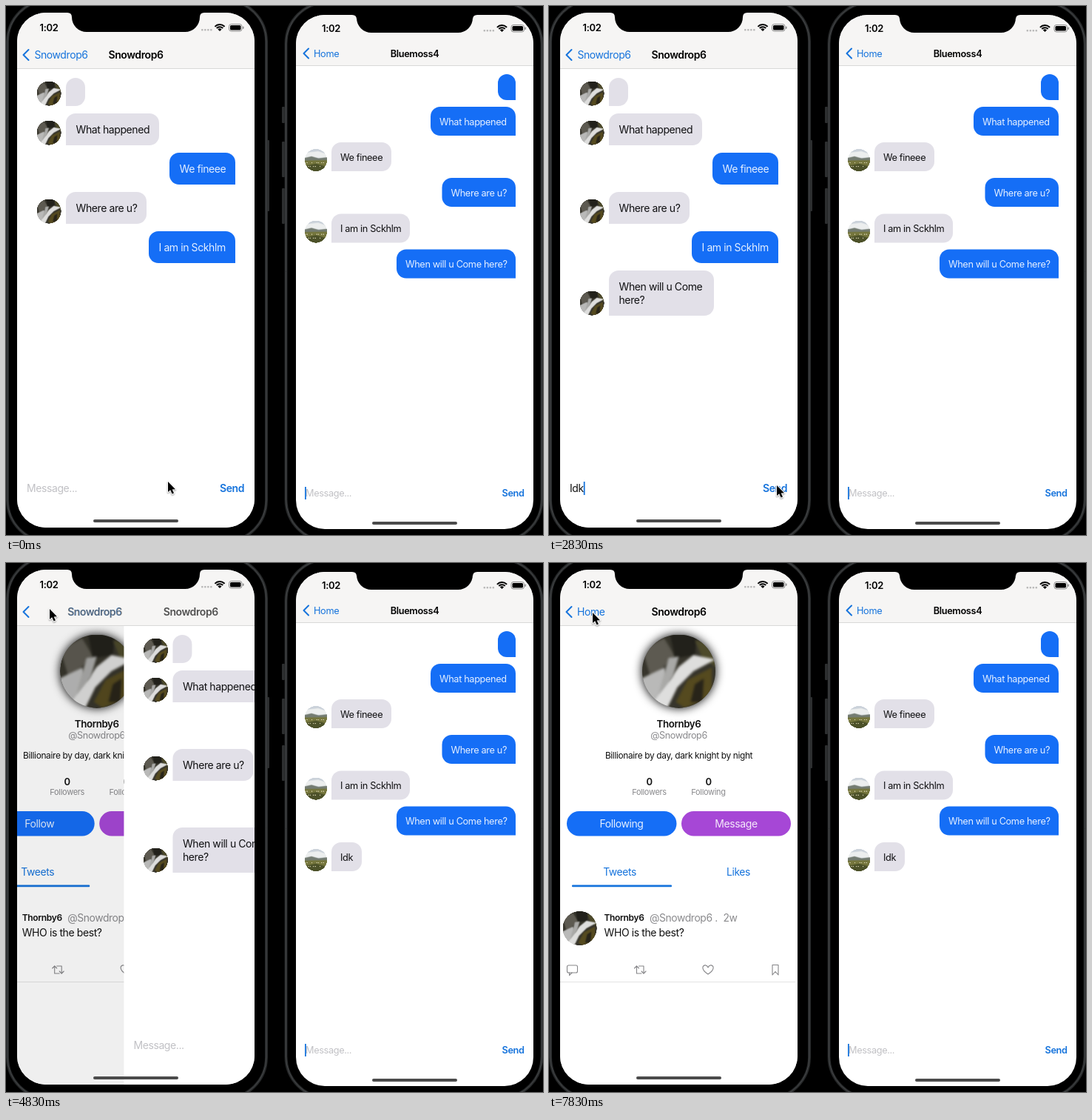
An HTML page with a canvas for the animation above (8 s loop, 726 px wide and 714 px high).

```html
<!DOCTYPE html>
<html lang="en">
<head>
<meta charset="utf-8">
<title>Chat on two phones</title>
<style>
html, body { margin: 0; width: 100%; height: 100%; overflow: hidden; background: #000; }
canvas { display: block; width: 726px; height: 714px; }
</style>
</head>
<body>
<canvas id="stage" width="726" height="714"></canvas>
<script>
const ctx = document.getElementById('stage').getContext('2d');
const LOOP = 8000, FPS = 6;
const BLUE = '#156ef6', LINK = '#1573dc', GREY = '#e2e0e8', HINT = '#c1c1c5', MUTED = '#8a8a8d';
const LEFT_USER = 'Snowdrop6', RIGHT_USER = 'Bluemoss4', FULL_NAME = 'Thornby6';

// Event times in ms
const POP = 4666.7, POP_LENGTH = 356;
const ARRIVE = 500, FOCUS = 1000, SENT = 3000, RECEIVED = 3330;
const PRESS = 6600, FOLLOWED = 6990;

const clamp = v => Math.max(0, Math.min(1, v));
const ease = v => (1 - Math.cos(Math.PI * clamp(v))) / 2;

function text(str, x, y, size, color, weight = 400, align = 'left') {
  ctx.font = `${weight} ${size}px Inter, Roboto, sans-serif`;
  ctx.letterSpacing = `${-0.029 * size}px`;
  ctx.textAlign = align;
  ctx.fillStyle = color;
  ctx.fillText(str, x, y + size * 0.364);
}

function box(x, y, w, h, r, color) {
  ctx.fillStyle = color;
  ctx.beginPath();
  ctx.roundRect(x, y, w, h, r);
  ctx.fill();
}

function line(points, color, width) {
  ctx.strokeStyle = color;
  ctx.lineWidth = width;
  ctx.lineCap = ctx.lineJoin = 'round';
  ctx.beginPath();
  points.forEach(([x, y], i) => i ? ctx.lineTo(x, y) : ctx.moveTo(x, y));
  ctx.stroke();
}

function withAlpha(alpha, draw) {
  ctx.save();
  ctx.globalAlpha *= clamp(alpha);
  draw();
  ctx.restore();
}

// Round pictures, painted once on a 100-unit square
function picture(paint) {
  const c = document.createElement('canvas');
  c.width = c.height = 200;
  const g = c.getContext('2d');
  g.scale(2, 2);
  g.beginPath();
  g.arc(50, 50, 50, 0, 7);
  g.clip();
  g.filter = 'blur(3px)';
  paint((color, ...p) => {
    g.fillStyle = color;
    g.beginPath();
    for (let i = 0; i < p.length; i += 2) g.lineTo(p[i], p[i + 1]);
    g.fill();
  }, g);
  return c;
}

const waterfall = picture(shape => {
  shape('#37352c', -9, -9, 109, -9, 109, 109, -9, 109);
  shape('#5d5a51', 0, 20, 30, 5, 45, 30, 12, 60);
  shape('#22211b', 38, 0, 75, 0, 72, 28, 45, 32);
  shape('#4d4a2b', 72, 8, 109, 15, 109, 50, 82, 32);
  shape('#b9b9b8', -5, 62, 30, 45, 40, 70, 20, 109, -5, 109);
  shape('#dededd', 70, 28, 100, 34, 70, 50, 48, 72, 30, 109, 10, 100, 34, 66, 50, 44);
  shape('#a9a9a7', 36, 32, 50, 30, 42, 58, 22, 82);
  shape('#554a1f', 62, 62, 95, 45, 95, 85, 58, 100, 46, 92);
  shape('#282419', 72, 68, 84, 60, 82, 92, 66, 92);
});

const meadow = picture((shape, g) => {
  shape('#cbd2da', -9, -9, 109, -9, 109, 109, -9, 109);
  shape('#eceeee', -9, 18, 60, 10, 109, 26, 109, 40, -9, 40);
  shape('#747c72', -9, 42, 30, 33, 62, 42, 109, 36, 109, 60, -9, 60);
  shape('#75763d', -9, 52, 109, 50, 109, 109, -9, 109);
  shape('#4c5129', -9, 78, 50, 66, 109, 82, 109, 109, -9, 109);
  g.filter = 'blur(1px)';
  g.fillStyle = '#ddd7b6';
  for (let i = 0; i < 14; i++) g.fillRect((i * 37) % 96, 60 + (i * 17) % 34, 4, 4);
});

const avatar = (img, x, y, r) => ctx.drawImage(img, x - r, y - r, 2 * r, 2 * r);

// A message bubble: theirs hangs from its left edge, mine from its right edge
function bubble(mine, edge, y, w, h, lines, size, pad) {
  const x = mine ? edge - w : edge;
  const r = Math.min(13, w / 2);
  box(x, y, w, h, mine ? [r, r, 0, r] : [r, r, r, 0], mine ? BLUE : GREY);
  const step = size * 1.29, top = y + h / 2 + 0.5 - (lines.length - 1) * step / 2;
  lines.forEach((s, i) => text(s, x + pad, top + i * step, size, mine ? '#e4efff' : '#101012'));
}

function chevron(x, y, h) {
  line([[x + h / 2, y - h / 2], [x, y], [x + h / 2, y + h / 2]], LINK, 2);
}

function statusBar(x, y) {
  text('1:02', x + 43, y + 20.5, 13, '#000', 600, 'center');
  for (let i = 0; i < 4; i++) box(x + 249 + i * 4, y + 22, 2.6, 2.6, 1, '#b9b9b9');
  const cx = x + 274, cy = y + 25;
  ctx.strokeStyle = '#000';
  ctx.lineCap = 'butt';
  ctx.lineWidth = 2;
  for (const r of [9, 5.8]) {
    ctx.beginPath();
    ctx.arc(cx, cy, r, -Math.PI * 0.76, -Math.PI * 0.24);
    ctx.stroke();
  }
  ctx.fillStyle = '#000';
  ctx.beginPath();
  ctx.moveTo(cx, cy);
  ctx.arc(cx, cy, 3.6, -Math.PI * 0.76, -Math.PI * 0.24);
  ctx.fill();
  ctx.strokeStyle = '#8f8f8f';
  ctx.lineWidth = 1;
  ctx.beginPath();
  ctx.roundRect(x + 286.5, y + 15.5, 17.5, 9.5, 3);
  ctx.stroke();
  box(x + 288, y + 17, 14.5, 6.5, 1.5, '#000');
  box(x + 305, y + 18.5, 1.5, 3.5, 1, '#8f8f8f');
}

function notch(x0, x1, top, bottom) {
  const r = 20, f = 6;
  ctx.fillStyle = '#000';
  ctx.beginPath();
  ctx.moveTo(x0 - f, top - 1);
  ctx.lineTo(x0 - f, top);
  ctx.quadraticCurveTo(x0, top, x0, top + f);
  ctx.arcTo(x0, bottom, x0 + r, bottom, r);
  ctx.arcTo(x1, bottom, x1, top + f, r);
  ctx.lineTo(x1, top + f);
  ctx.quadraticCurveTo(x1, top, x1 + f, top);
  ctx.lineTo(x1 + f, top - 1);
  ctx.fill();
}

function body(x, y, w, h) {
  ctx.beginPath();
  ctx.roundRect(x, y, w, h, 56);
  ctx.fillStyle = '#000';
  ctx.fill();
  ctx.strokeStyle = '#27292a';
  ctx.lineWidth = 4;
  ctx.stroke();
  ctx.strokeStyle = '#47494b';
  ctx.lineWidth = 1;
  ctx.stroke();
}

function screen(x, y, w, h, draw) {
  ctx.save();
  ctx.beginPath();
  ctx.roundRect(x, y, w, h, 39);
  ctx.clip();
  ctx.fillStyle = '#fff';
  ctx.fillRect(x, y, w, h);
  draw();
  ctx.restore();
}

function navBar(x, y, bottom) {
  ctx.fillStyle = '#f6f5f4';
  ctx.fillRect(x, y, 321, bottom - y);
  ctx.fillStyle = '#d9d9d8';
  ctx.fillRect(x, bottom, 321, 1);
}

function leftChat(t) {
  ctx.fillStyle = '#fff';
  ctx.fillRect(15, 85, 321, 620);
  const say = (mine, y, w, h, ...lines) => {
    bubble(mine, mine ? 310 : 81, y, w, h, lines, 14, 13.5);
    if (!mine) avatar(waterfall, 58, y + h - 17, 16.5);
  };
  say(false, 97, 26, 38);
  say(false, 145, 126, 43, 'What happened');
  say(true, 198, 89, 43, 'We fineee');
  say(false, 251, 109, 43, 'Where are u?');
  say(true, 304, 117, 43, 'I am in Sckhlm');
  if (t >= ARRIVE) say(false, 357, 142, 61, 'When will u Come', 'here?');
  if (t >= SENT) say(true, 428, 46, 43, 'Idk');

  const typed = t < SENT ? 'Idk'.slice(0, clamp((t - 1500) / 500) * 3) : '';
  text(typed || 'Message...', 28, 651, 14, typed ? '#111' : HINT);
  const end = typed ? 28 + ctx.measureText(typed).width : 28;
  const lit = t < SENT ? (t - FOCUS) / 350 : t < POP && t % 1000 > 500 ? 1 : 0;
  withAlpha(lit, () => box(end, 642, 1.8, 18, 0, LINK));
  text('Send', 289, 651, 14, LINK, 600);
}

function icons() {
  const c = '#858588', y = 549;
  ctx.strokeStyle = c;
  ctx.lineWidth = 1.1;
  ctx.beginPath();
  ctx.roundRect(24.5, 543, 14, 10, 2);
  ctx.stroke();
  line([[27.5, 553], [27.5, 556.5], [31, 553]], c, 1.1);
  line([[115.5, y - 2], [118.5, y - 5], [121.5, y - 2]], c, 1.1);
  line([[118.5, y - 5], [118.5, y + 5], [125, y + 5]], c, 1.1);
  line([[125, y + 2], [128, y + 5], [131, y + 2]], c, 1.1);
  line([[128, y + 5], [128, y - 5], [121.5, y - 5]], c, 1.1);
  ctx.beginPath();
  ctx.moveTo(215, 555);
  ctx.bezierCurveTo(204, 548, 208, 542, 212, 543);
  ctx.quadraticCurveTo(214, 543.5, 215, 546);
  ctx.quadraticCurveTo(216, 543.5, 218, 543);
  ctx.bezierCurveTo(222, 542, 226, 548, 215, 555);
  ctx.stroke();
  line([[302, 556], [302, 542.5], [310, 542.5], [310, 556], [306, 551.5], [302, 556]], c, 1.1);
}

function profile(t) {
  ctx.fillStyle = '#fff';
  ctx.fillRect(15, 85, 321, 620);
  ctx.save();
  ctx.shadowColor = '#000';
  ctx.shadowBlur = 13;
  avatar(waterfall, 175.5, 146, 49.5);
  ctx.restore();
  text(FULL_NAME, 175.5, 217, 13.3, '#111', 600, 'center');
  text('@' + LEFT_USER, 175.5, 232.5, 12.6, MUTED, 400, 'center');
  text('Billionaire by day, dark knight by night', 175.5, 260, 11.9, '#111', 400, 'center');
  [['Followers', 135.5], ['Following', 215.5]].forEach(([label, x]) => {
    text('0', x, 295, 13, '#111', 600, 'center');
    text(label, x, 309, 11, MUTED, 400, 'center');
  });

  const pressed = t >= PRESS && t < FOLLOWED;
  box(24, 335, 148.5, 33.5, 16.7, pressed ? '#c4defb' : BLUE);
  text(t < FOLLOWED ? 'Follow' : 'Following', 98, 352, 14, pressed ? '#b5d0f2' : '#e4efff', 400, 'center');
  box(179, 335, 148, 33.5, 16.7, '#a647d6');
  text('Message', 253, 352, 14, '#f5e9fb', 400, 'center');

  text('Tweets', 95.5, 416.5, 13.9, LINK, 400, 'center');
  text('Likes', 256, 416.5, 13.9, LINK, 400, 'center');
  box(31, 434.5, 135, 2.7, 1, LINK);

  avatar(waterfall, 41.5, 493, 23);
  text(FULL_NAME, 74.5, 478.5, 12, '#111', 600);
  text('@' + LEFT_USER + ' .', 136, 478.5, 13.9, MUTED);
  text('2w', 235.5, 478.5, 13.9, MUTED);
  text('WHO is the best?', 74.5, 498.5, 14, '#111');
  icons();
  ctx.fillStyle = '#e3e3e3';
  ctx.fillRect(15, 565, 318, 1);
}

function leftPhone(t) {
  body(2, -8, 350, 731);
  box(353, 181, 3, 96, 1, '#2c2e2f');
  screen(15, 9, 321, 695, () => {
    const p = ease((t - POP) / POP_LENGTH);
    if (p > 0) {
      ctx.save();
      ctx.translate(-96 * (1 - p), 0);
      profile(t);
      ctx.restore();
      ctx.fillStyle = `rgba(0,0,0,${0.115 * (1 - p)})`;
      ctx.fillRect(15, 85, 321, 620);
    }
    if (p < 1) {
      ctx.save();
      ctx.translate(321 * p, 0);
      leftChat(t);
      ctx.restore();
    }
    navBar(15, 9, 84);
    chevron(23.5, 66, 14);
    // The back label slides into the title's place as the title leaves
    const x = 74.5 + 101 * p;
    withAlpha(1 - p, () => text(LEFT_USER, x, 66, 14, LINK, 400, 'center'));
    withAlpha(p, () => text(LEFT_USER, x, 66, 14, '#000', 600, 'center'));
    withAlpha(1 - p ** 1.4, () => text(LEFT_USER, 175.5 + 165 * p, 66, 14, '#000', 600, 'center'));
    withAlpha(p * 2 - 1, () => text('Home', 38 - 30 * (1 - p), 66, 14, LINK));
    statusBar(15, 9);
    box(118, 693, 115, 4, 2, '#4b4b4b');
  });
  notch(89, 262, 9, 35);
}

function rightPhone(t) {
  body(378.5, -5, 346, 727);
  [[136, 22], [183, 48], [246, 48]].forEach(([y, h]) => box(373, y, 4, h, 1, '#2c2e2f'));
  screen(392, 12, 321, 694, () => {
    navBar(392, 12, 80);
    chevron(402.5, 64, 13);
    text('Home', 416, 64, 12.75, LINK);
    text(RIGHT_USER, 552.5, 64, 12.75, '#000', 600, 'center');
    statusBar(396.5, 10);
    const say = (mine, y, w, h, ...lines) => {
      bubble(mine, mine ? 689 : 440, y, w, h, lines, 12.75, 12);
      if (!mine) avatar(meadow, 419, y + h - 15, 15);
    };
    say(true, 92, 24, 35);
    say(true, 136, 115, 39, 'What happened');
    say(false, 184, 81, 39, 'We fineee');
    say(true, 232, 99.5, 39, 'Where are u?');
    say(false, 280.5, 106, 39, 'I am in Sckhlm');
    say(true, 328.5, 161, 39, 'When will u Come here?');
    if (t >= RECEIVED) say(false, 377, 41, 39, 'Idk');
    text('Message...', 405, 657.5, 12.75, HINT);
    box(404, 649, 1.8, 17, 0, LINK);
    text('Send', 670.5, 657.5, 12.75, LINK, 600);
    box(495, 696, 115, 4, 2, '#4b4b4b');
  });
  notch(474, 631, 12, 36);
}

// Pointer stops: time, x, y
const PATH = [
  [0, 219, 642], [1000, 177, 646], [2000, 177, 646], [2600, 308, 647], [3100, 308, 647],
  [4000, 58, 58], [4170, 58, 58], [4800, 59, 62], [5400, 59, 62], [6300, 145, 348],
  [6900, 145, 348], [7600, 59, 67], [LOOP, 59, 67]
];

function pointer(t) {
  const i = PATH.findIndex(stop => stop[0] > t);
  const [t0, x0, y0] = PATH[i - 1], [t1, x1, y1] = PATH[i];
  const k = ease((t - t0) / (t1 - t0));
  ctx.save();
  ctx.translate(x0 + (x1 - x0) * k, y0 + (y1 - y0) * k);
  ctx.beginPath();
  [[0, 0], [0, 14], [3.2, 11.2], [5.6, 16.6], [8, 15.5], [5.7, 10.4], [10, 10.2]]
    .forEach(p => ctx.lineTo(...p));
  ctx.closePath();
  ctx.lineJoin = 'round';
  ctx.strokeStyle = '#fff';
  ctx.lineWidth = 2;
  ctx.shadowColor = 'rgba(0,0,0,.4)';
  ctx.shadowBlur = 2;
  ctx.shadowOffsetY = 1;
  ctx.stroke();
  ctx.shadowColor = 'transparent';
  ctx.fillStyle = '#000';
  ctx.fill();
  ctx.restore();
}

function render(now) {
  // The picture holds for a sixth of a second at a time
  const step = Math.floor((now % LOOP + 4) * FPS / 1000) % (LOOP * FPS / 1000);
  const t = step * 1000 / FPS;
  ctx.fillStyle = '#000';
  ctx.fillRect(0, 0, 726, 714);
  leftPhone(t);
  rightPhone(t);
  pointer(t);
}

let start;
function tick(now) {
  start ??= now;
  render(now - start);
  requestAnimationFrame(tick);
}
render(0);
requestAnimationFrame(tick);
</script>
</body>
</html>
```
